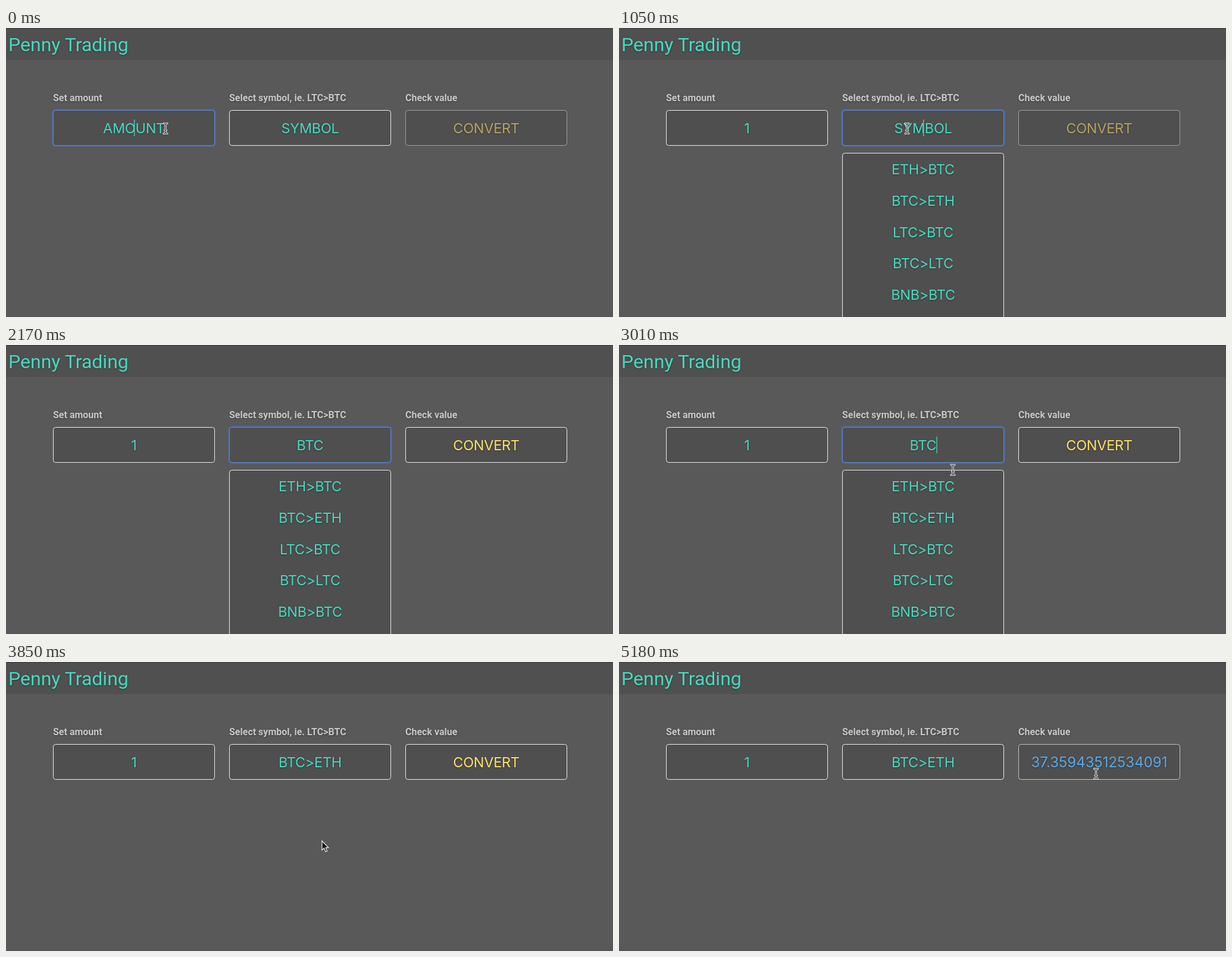
These frames come from a looping animation (1020x486 px, 5.25 s). An HTML page:

```html
<!DOCTYPE html>
<html lang="en">
<head>
<meta charset="utf-8">
<title>Penny Trading</title>
<style>
html, body { margin: 0; width: 100%; height: 100%; overflow: hidden; background: #595959; }
svg { display: block; width: 1020px; height: 486px; }
text { font: 23.5px Inter, sans-serif; letter-spacing: -.3px; text-anchor: middle; fill: #48d9c0; text-shadow: 0 1px 3px #0005; }
.title { font: 32px Roboto, sans-serif; letter-spacing: 0; text-anchor: start; }
.label { font: bold 16px Roboto, sans-serif; letter-spacing: 0; text-anchor: start; fill: #c8c8c8; }
.off { fill: #b5a365; }
.ready { fill: #ffe168; }
.done { fill: #5aa9e6; font-size: 24px; letter-spacing: 0; }
.box { fill: #4f4f4f; stroke: #f0f0f0; }
.box.focus { stroke: #5f86cc; filter: drop-shadow(0 0 1.5px #4a74c0) drop-shadow(0 0 1px #4a74c0); }
.box.off { stroke: #a0a0a0; }
.box.done { stroke: #c4c4c4; }
.box.hover { stroke: #555; }
#click { fill: none; stroke: #222; stroke-width: 3.4; }
#click .inner { stroke: #eee; stroke-width: 1.2; }
</style>
</head>
<body>
<svg viewBox="0 0 1020 486">
  <defs>
    <path id="stem" d="M-3 -8.5Q0 -8.5 0 -6Q0 -8.5 3 -8.5M0 -6V6M-3 8.5Q0 8.5 0 6Q0 8.5 3 8.5M-1.5 3H1.5"/>
  </defs>
  <rect width="1020" height="54" fill="#505050"/>
  <rect width="1020" height="1.5" fill="#434343"/>
  <rect y="485" width="1020" height="1" fill="#505050"/>
  <text class="title" x="4" y="39">Penny Trading</text>
  <g id="fields"></g>
  <g id="list"><rect class="box" x="375.5" y="210.5" width="271" height="300" rx="4"/></g>
  <rect id="caret" width="1.3" height="28" y="154" fill="#48d9c0"/>
  <g id="mouse">
    <g id="click"><circle r="30.5"/><circle class="inner" r="30.5"/></g>
    <g id="beam" fill="none" stroke-linecap="round">
      <use href="#stem" stroke="#eee" stroke-width="3.2"/>
      <use href="#stem" stroke="#333" stroke-width="1.2"/>
    </g>
    <path id="arrow" d="M0 0V15.2L3.5 12L6 18L8.6 17L6.2 11.2H10.8Z" fill="#111" stroke="#f4f4f4" stroke-width="1.2"/>
    <path id="hand" d="M-.5 1.2Q.8 -.2 2 1.4L3.2 6Q4.6 5 5.4 6.6Q7 5.8 7.6 7.4Q9.3 7 9.6 9V12L8.2 15.6H1.4L-3.4 10.4Q-4.2 8.4 -1.8 8.8L.4 10.4L-1 3Z" fill="#f4f4f4" stroke="#222"/>
  </g>
</svg>
<script>
const $ = id => document.getElementById(id);
const LOOP = 5250, LEFT = [79, 375, 671], BASE = 177;

function add(parent, tag, attrs, content = '') {
  const el = document.createElementNS('http://www.w3.org/2000/svg', tag);
  for (const k in attrs) el.setAttribute(k, attrs[k]);
  el.textContent = content;
  return parent.appendChild(el);
}

const fields = ['Set amount', 'Select symbol, ie. LTC>BTC', 'Check value'].map((label, i) => {
  const x = LEFT[i], g = $('fields');
  add(g, 'text', { class: 'label', x, y: 123 }, label);
  return {
    mid: x + 136,
    box: add(g, 'rect', { x: x + .5, y: 138.5, width: 271, height: 59, rx: 4 }),
    text: add(g, 'text', { x: x + 136, y: BASE })
  };
});
['ETH>BTC', 'BTC>ETH', 'LTC>BTC', 'BTC>LTC', 'BNB>BTC'].forEach((s, i) =>
  add($('list'), 'text', { x: 511, y: 246 + i * 52.75 }, s));

// time, value: the last step reached holds
const amount = [[0, 'AMOUNT'], [140, '1']];
const symbol = [[0, 'SYMBOL'], [1260, 'B'], [1400, 'BT'], [1470, 'BTC'], [3780, 'BTC>ETH']];
const result = [[0, 'CONVERT'], [4900, '37.35943512534091']];
const button = [[0, 'off'], [1260, 'ready'], [4900, 'done']];
const focus = [[0, 0], [980, 1], [3780, -1]];
const caretReset = [[0, 0], [140, 140], [980, 980], [1260, 1260], [1400, 1400], [1470, 1470]];
const pointer = [[0, 'beam'], [140, ''], [280, 'beam'], [490, 'arrow'], [560, 'beam'], [1260, ''],
  [2660, 'beam'], [3080, 'hand'], [3780, 'arrow'], [4200, 'hand'], [4900, 'beam']];
const clicks = [[910, 1050], [3640, 3780], [4620, 4830]];

// time, x, y: eased between stops
const path = [[280, 268, 169], [770, 484, 169], [2660, 484, 169], [3010, 561, 210],
  [3500, 531, 301], [3900, 531, 301], [4340, 801.5, 188]];

const at = (steps, t) => steps.findLast(s => s[0] <= t)[1];

function place(t) {
  const i = path.findIndex(p => p[0] > t);
  if (i < 1) return (i ? path.at(-1) : path[0]).slice(1);
  const [t0, x0, y0] = path[i - 1], [t1, x1, y1] = path[i];
  const u = (t - t0) / (t1 - t0), e = u * u * (3 - 2 * u);
  return [x0 + (x1 - x0) * e, y0 + (y1 - y0) * e];
}

function show(el, on) { el.style.display = on ? '' : 'none'; }

function draw(t) {
  const active = at(focus, t), state = at(button, t);
  [amount, symbol, result].forEach((steps, i) => {
    const s = at(steps, t), f = fields[i];
    if (f.text.textContent !== s) f.text.textContent = s;
    f.box.setAttribute('class', 'box' + (active === i ? ' focus' : ''));
  });

  const [x, y] = place(t), kind = at(pointer, t);
  const over = state === 'ready' && x > 671 && y < 198;
  fields[2].box.classList.add(over ? 'hover' : state);
  fields[2].box.style.fill = '#4f4f4f';
  fields[2].text.setAttribute('class', state);

  show($('list'), active === 1);
  const blink = Math.floor((t - at(caretReset, t)) / 530) % 2 === 0;
  show($('caret'), active >= 0 && blink);
  if (active >= 0) {
    const f = fields[active], empty = t < 140 || (active === 1 && state === 'off');
    const half = empty ? 0 : f.text.getComputedTextLength() / 2;
    $('caret').setAttribute('x', f.mid + half);
  }

  $('mouse').setAttribute('transform', `translate(${x} ${y})`);
  for (const id of ['beam', 'arrow', 'hand']) show($(id), id === kind);
  show($('click'), clicks.some(([a, b]) => t >= a && t < b));
}

const start = performance.now();
function tick() {
  draw((performance.now() - start) % LOOP);
  requestAnimationFrame(tick);
}
tick();
</script>
</body>
</html>
```
